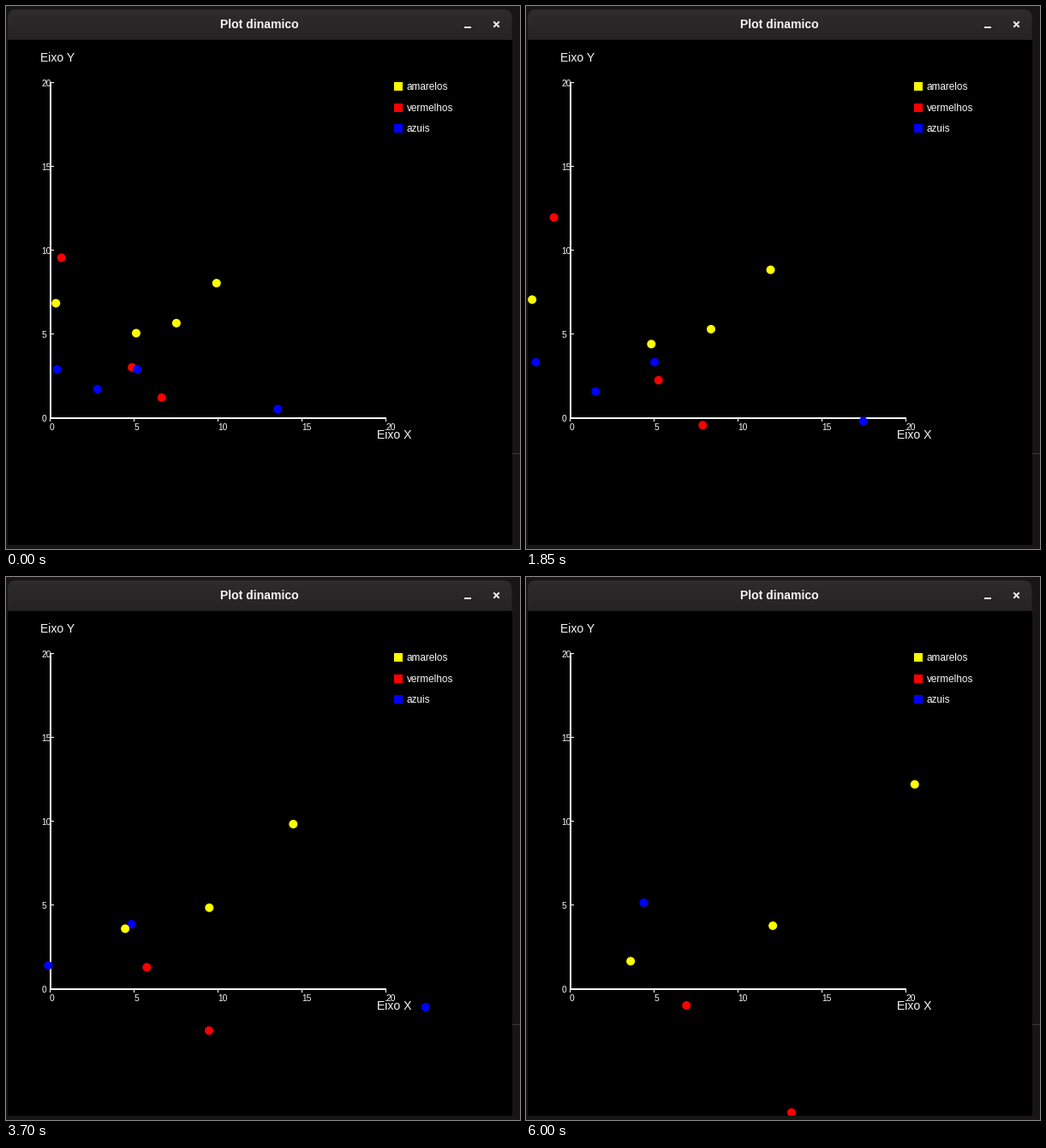
These frames come from a looping animation (600 by 635 pixels, 6030 ms). A matplotlib script:

```python
import matplotlib.pyplot as plt
import numpy as np
from matplotlib.animation import FuncAnimation
from matplotlib.patches import Circle, FancyBboxPatch, Rectangle

W, H = 600, 635
FRAMES, STEP = 201, 30
ORIGIN_X, ORIGIN_Y, UNIT = 52, 482, 19.6
LEFT, RIGHT = 2, 590.5
YELLOW, RED, BLUE = "#ffff00", "#ff0000", "#0000ff"
INK = "#f8f8f8"

# Start positions; each group spreads away from its own centroid.
GROUPS = [
    (RED, [(65, 294.7), (147, 422.5), (181.6, 457.8)]),
    (BLUE, [(316.6, 471.3), (106.8, 448), (60, 425), (153, 425)]),
    (YELLOW, [(245.5, 324.2), (198.8, 370.8), (152, 382.5), (58.6, 347.6)]),
]

# Logarithm of the spread over time, with a slower stretch in the middle.
TIMES = [0, 1180, 2520, 3700, 4450, 5120, 6030]
LOG_SPREAD = [0, 0.249, 0.55, 0.74, 0.9087, 1.0606, 1.2695]

fig = plt.figure(figsize=(W / 100, H / 100), dpi=100, facecolor="#181516")
ax = fig.add_axes([0, 0, 1, 1])
ax.axis("off")


def box(x, y, w, h, color, z=1):
    patch = Rectangle((x, y), w, h, facecolor=color, edgecolor="none",
                      linewidth=0, zorder=z)
    return ax.add_patch(patch)


def label(x, y, text, px, color=INK, **kw):
    ax.text(x, y, text, fontsize=px * 0.72, color=color, zorder=4,
            family="Liberation Sans", va="baseline", **kw)


def draw_window():
    width = RIGHT - LEFT
    box(591, 523, 9, 1, "#3a3738")
    bar = FancyBboxPatch((LEFT, 4), width, 80, facecolor="none", edgecolor="none",
                         boxstyle="round,pad=0,rounding_size=10")
    ax.add_patch(bar)
    shade = np.linspace(0, 1, 36)[:, None, None]
    top, bottom = np.array([46, 43, 45]), np.array([38, 35, 37])
    grad = (top + (bottom - top) * shade) / 255
    image = ax.imshow(grad, extent=(LEFT, RIGHT, 40, 4), aspect="auto", zorder=1)
    image.set_clip_path(bar)
    ax.set_xlim(0, W)
    ax.set_ylim(H, 0)
    box(LEFT, 39, width, 1, "#1a1819", 2)
    label(296, 26.4, "Plot dinamico", 14, "#f4f4f4", weight="bold", ha="center")
    box(535, 24, 8, 2, "#f2f2f2", 3)
    for y0, y1 in ((18.3, 24.7), (24.7, 18.3)):
        ax.plot([569.3, 575.7], [y0, y1], color="#f2f2f2", lw=2 * 0.72,
                solid_capstyle="butt", zorder=3)
    return box(LEFT, 40, width, 589.5, "black", 2)


def draw_axes():
    box(51, 89, 2, 394, "white", 3)
    box(51, 481, 393, 2, "white", 3)
    for value in range(0, 21, 5):
        x, y = ORIGIN_X + value * UNIT, ORIGIN_Y - value * UNIT
        box(52, round(y) - 1, 4, 1, "white", 3)
        box(round(x) - 1, 482, 1, 4, "white", 3)
        label(41.3, y + 3.8, str(value), 10.2)
        label(x - 0.9, 495.8, str(value), 10.2)
    label(40.3, 64.8, "Eixo Y", 14)
    label(432.6, 505.8, "Eixo X", 14)


def draw_legend():
    names = (("amarelos", YELLOW), ("vermelhos", RED), ("azuis", BLUE))
    for i, (name, color) in enumerate(names):
        y = 94 + 24.7 * i
        box(453, round(y) - 5, 10, 10, color, 3)
        label(467.5, y + 4, name, 11.8)


canvas = draw_window()
draw_axes()
draw_legend()

dots = []
for color, points in GROUPS:
    start = np.array(points)
    center = start.mean(axis=0)
    for p in start:
        dot = Circle(p, 5, facecolor=color, edgecolor="none", zorder=5)
        ax.add_patch(dot)
        dot.set_clip_path(canvas)
        dots.append((dot, center, p - center))


def update(frame):
    now = (frame + 0.5) * STEP
    spread = np.exp(np.interp(now, TIMES, LOG_SPREAD))
    for dot, center, offset in dots:
        dot.center = center + offset * spread
    return [d[0] for d in dots]


anim = FuncAnimation(fig, update, frames=FRAMES, interval=STEP,
                     repeat=True, repeat_delay=0, blit=False)
plt.show()
```
